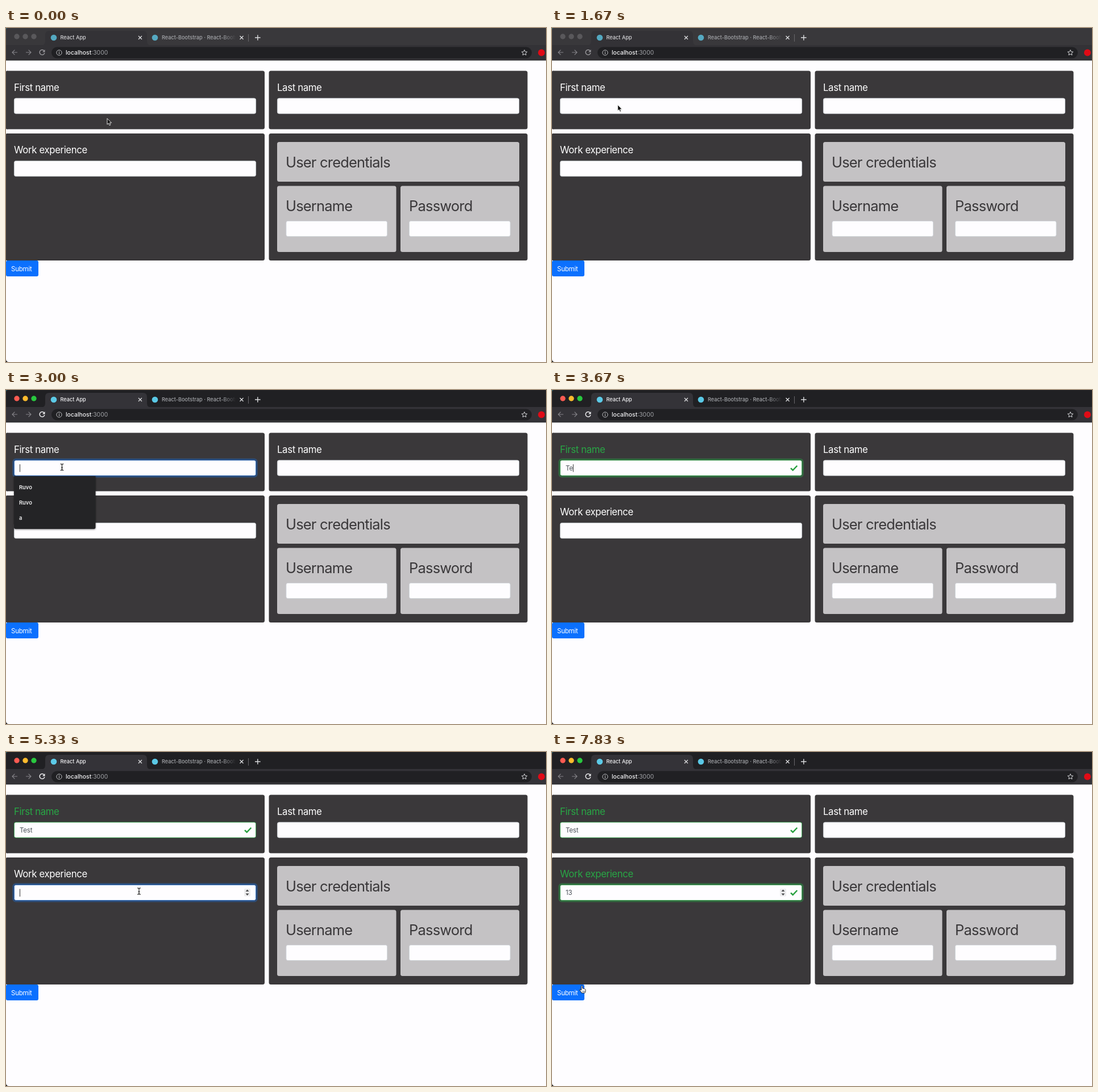
Recreate the animation shown at these times as an HTML page. Size 950 px wide and 589 px high, loop 8 s.

```html
<!DOCTYPE html>
<html lang="en">
<head>
<meta charset="utf-8">
<title>Form validation</title>
<style>
html, body { margin: 0; width: 100%; height: 100%; overflow: hidden; background: #fefdff; }
svg { display: block; width: 100%; height: 100%; font-family: Inter, "Open Sans", sans-serif; }
text { white-space: pre; }
.label { font-size: 16.8px; letter-spacing: -.37px; fill: #fff; }
.head { font-size: 25.4px; letter-spacing: -.75px; fill: #393739; }
.value { font-size: 11.5px; letter-spacing: -.2px; fill: #495057; }
.tab { font-size: 9.2px; font-weight: 500; }
.item { font-size: 9.4px; font-weight: 600; fill: #f1f1f2; }
</style>
</head>
<body>
<svg id="stage" viewBox="0 0 950 589"></svg>
<script>
const LOOP = 8000, STEP = 1000 / 6, FADE = 150;
const stage = document.getElementById('stage');
const GREEN = [40, 167, 69], BLUE = [28, 105, 205], GREY = [206, 212, 218];

function add(tag, attrs, text, parent = stage) {
  const el = document.createElementNS('http://www.w3.org/2000/svg', tag);
  set(el, attrs);
  if (text) el.textContent = text;
  return parent.appendChild(el);
}
function set(el, attrs) {
  for (const k in attrs) el.setAttribute(k, attrs[k]);
}
const box = (x, y, width, height, fill, rx = 0, more = {}) =>
  add('rect', { x, y, width, height, fill, rx, ...more });
const line = (d, stroke, width = 1.2, parent = stage) =>
  add('path', { d, stroke, 'stroke-width': width, fill: 'none' }, '', parent);
const label = (x, y, s, cls = 'label', more = {}) => add('text', { x, y, class: cls, ...more }, s);
const show = (el, on) => set(el, { visibility: on ? 'visible' : 'hidden' });
const clamp = v => Math.max(0, Math.min(1, v));
const mix = (a, b, k) => `rgb(${a.map((v, i) => Math.round(v + (b[i] - v) * k))})`;

// Browser chrome
const strip = box(0, 0, 950, 31, '#202023');
const tab = add('path', { d: 'M61 31q8 0 8-8V12q0-7 7-7H241q7 0 7 7v11q0 8 8 8z' });
const bar = box(0, 30, 950, 27.5, '#343338');
const lights = [19, 34, 49].map(cx => add('circle', { cx, cy: 15, r: 4.7 }));
const icons = [84, 262].map(cx => add('circle', { cx, cy: 17, r: 5.3, fill: '#61dafb' }));
const title = label(95.5, 20.3, 'React App', 'tab');
const fade = add('linearGradient', { id: 'fade', gradientUnits: 'userSpaceOnUse', x1: 380, x2: 405 });
add('stop', { offset: 0, 'stop-color': '#a4a6aa' }, '', fade);
add('stop', { offset: 1, 'stop-color': '#a4a6aa', 'stop-opacity': 0 }, '', fade);
label(274, 20.3, 'React-Bootstrap · React-Boots', 'tab', { fill: 'url(#fade)' });
const cross = x => line(`M${x - 3} 14l6 6m0-6l-6 6`, '#dedfe1', 1.3);
cross(236);
cross(414.5);
line('M426.5 11v13', '#68676b', 1);
line('M438 17h9.6m-4.8-4.8v9.6', '#dcdde0', 1.4);
line('M20 43H11m4.4-4.4L11 43l4.4 4.4M35 43h9m-4.4-4.4L44 43l-4.4 4.4', '#858489', 1.2);
const reload = add('path', { d: 'M67 40.2a4.4 4.4 0 1 0 .9 3.6', fill: 'none', 'stroke-width': 1.4 });
const reloadTip = add('path', { d: 'M68.5 38v4.4h-4.4z' });
box(80, 33.5, 845, 20, '#202023', 10);
add('circle', { cx: 93.5, cy: 43.5, r: 4.6, fill: 'none', stroke: '#c4c5c8', 'stroke-width': 1 });
line('M93.5 42.8v3.2M93.5 40.8v1.1', '#c4c5c8', 1.1);
const url = label(105, 47.2, '', 'url', { 'font-size': 10.4 });
add('tspan', { fill: '#f2f2f4', 'font-weight': 500 }, 'localhost', url);
add('tspan', { fill: '#a0a2a6' }, ':3000', url);
line('M912 38.6l1.4 3.2 3.5.3-2.7 2.3.8 3.4-3-1.8-3 1.8.8-3.4-2.7-2.3 3.5-.3z', '#d5d6d9', 1);
add('circle', { cx: 942, cy: 43.5, r: 6, fill: '#e00b16' });
line('M0 57H950', '#29282b', 1);
add('path', { d: 'M0 0h4Q0 0 0 4z', fill: '#27646d' });

// Page
box(0, 57.5, 950, 531.5, '#fefdff');
for (const x of [0, 462.5])
  for (const [y, h] of [[75.5, 103], [186, 224]]) {
    box(x, y, 455, h, '#3a383a', 3.5);
    if (!x) box(0, y, 4, h, '#3a383a', 1.5);
  }
box(477, 201, 426, 70, '#c4c2c4', 3.5);
box(477, 278.5, 209.5, 116.5, '#c4c2c4', 3.5);
box(694, 278.5, 209, 116.5, '#c4c2c4', 3.5);
label(492, 245.6, 'User credentials', 'head');
label(492, 323, 'Username', 'head');
label(709, 323, 'Password', 'head');
label(477, 110.5, 'Last name');
const input = (x, y, w) =>
  box(x + .4, y + .4, w - .8, 27.2, '#fefdff', 3, { stroke: '#ced4da', 'stroke-width': .8 });
input(477, 123.5, 426);
input(492.5, 340, 178.5);
input(709, 340, 178.5);
box(0, 410, 57, 28, '#0b70fe', 3);
label(9, 428.6, 'Submit', 'value', { style: 'fill:#fff' });
add('path', { d: 'M0 584q0 5 5 5H0z', fill: '#000' });

// Field with label, focus ring, caret and validity tick
function field(y, name) {
  const caption = label(14, y - 13, name);
  const halo = box(12.6, y - 1.4, 428.8, 30.8, 'none', 4.5, { 'stroke-width': 2.6 });
  const frame = input(14, y, 426);
  const value = label(24, y + 18.3, ' ', 'value');
  const caret = box(24, y + 7.5, 1, 13.5, '#333');
  const tick = line(`M420 ${y + 14.3}l3.7 3.7 7.6-8`, '#28a040', 2.5);
  return { caption, halo, frame, value, caret, tick };
}
function paint(f, text, focus, valid, caret) {
  const ok = clamp(valid);
  const color = mix(mix(GREY, BLUE, focus).match(/\d+/g).map(Number), GREEN, ok);
  const ring = mix(BLUE, GREEN, ok);
  f.caption.style.fill = valid >= 0 ? '#28a745' : '#fff';
  set(f.frame, { stroke: color });
  set(f.halo, { stroke: ring, 'stroke-opacity': .42 * focus });
  f.value.textContent = text;
  show(f.tick, valid >= 0);
  show(f.caret, caret);
  if (caret) set(f.caret, { x: 24 + (text ? f.value.getComputedTextLength() : 0) });
}
const first = field(123.5, 'First name');
const work = field(234, 'Work experience');
const spin = add('g', {});
add('rect', { x: -5.5, y: 241, width: 11, height: 13.5, rx: 1.5, fill: '#ececee' }, '', spin);
add('path', { d: 'M-3 246l3-3.6 3 3.6zM-3 249.5l3 3.6 3-3.6z', fill: '#48484a' }, '', spin);

const menu = add('g', { style: 'filter:drop-shadow(0 1px 1.5px rgba(0,0,0,.5))' });
add('path', { d: 'M14 152H157.500V242q0 3-3 3H17q-3 0-3-3z', fill: '#242426' }, '', menu);
['Ruvo', 'Ruvo', 'a'].forEach((s, i) =>
  add('text', { x: 23, y: 175.3 + 27 * i, class: 'item' }, s, menu));

// Pointers, each drawn with its hot spot at 0,0
const ring = add('circle', { r: 12.4, fill: '#fff', 'fill-opacity': .3, stroke: '#111', 'stroke-width': 1.7 });
const pointers = { arrow: add('g', {}), beam: add('g', {}), hand: add('g', {}) };
add('path', {
  d: 'M0 0V10.6L2.4 8.400 4 12.200 5.900 11.400 4.300 7.700H7.600Z',
  fill: '#111', stroke: '#f4f4f4', 'stroke-width': .9
}, '', pointers.arrow);
const beam = 'M-2.8-5.600Q0-5.600 0-4V4Q0 5.600-2.800 5.600M2.800-5.600Q0-5.600 0-4M0 4Q0 5.600 2.800 5.600M-1.500 1H1.500';
line(beam, '#fff', 2, pointers.beam);
line(beam, '#111', 1.1, pointers.beam);
add('path', {
  d: 'M-1.500-5Q-1.500-6.300-.4-6.300T.7-5V-1.500Q2-2.300 2.700-1 4-1.600 4.500-.4 6-.6 6 1V3Q6 5 4.700 6.500H-.8Q-2 4-4.300 1.500-4.500 0-3 .2L-1.500 1.500Z',
  fill: '#fff', stroke: '#111', 'stroke-width': .9
}, '', pointers.hand);
line('M.8 2.500v2.500M2.600 2.500v2.500M4.300 2.500v2.500', '#111', .6, pointers.hand);

// Time, x, y
const moves = [
  [[0, 178, 159.5], [500, 178, 159.5], [1167, 136, 138], [1333, 136, 138], [1500, 133, 135], [1833, 98.5, 136], [3490, 98.5, 136]],
  [[4990, 226, 214], [5160, 234, 245.5], [6660, 234, 245.5]],
  [[7320, 200, 280], [7820, 53, 418.5], [8000, 53, 418.5]]
];
function pointerAt(t) {
  const path = moves.find(m => t >= m[0][0] && t < m[m.length - 1][0]);
  if (!path) return null;
  const i = path.findIndex(p => p[0] > t), [a, b] = [path[i - 1], path[i]];
  const k = (t - a[0]) / (b[0] - a[0]);
  return [a[1] + (b[1] - a[1]) * k, a[2] + (b[2] - a[2]) * k];
}
function pointerKind(t, x, y) {
  if (t < 1950) return 'arrow';
  if (x < 57 && y > 410) return 'hand';
  const inField = x > 14 && x < 440 && [123.5, 234].some(top => y > top && y < top + 28);
  return inField ? 'beam' : 'arrow';
}

const typed = (t, s, times) => s.slice(0, times.filter(k => t >= k).length);
const blink = (t, since) => Math.floor((t - since) / 500) % 2 === 0;
const ramp = (t, start) => clamp((t - start) / FADE);
const since = (t, start) => t < start ? -1 : (t - start) / FADE;

function draw(now) {
  const t = Math.floor((now % LOOP + 5) / STEP) * STEP + 1;
  const active = t > 1950;
  set(strip, { fill: active ? '#202023' : '#39383b' });
  set(tab, { fill: active ? '#343338' : '#333236' });
  set(bar, { fill: active ? '#343338' : '#333236' });
  lights.forEach((el, i) => set(el, { fill: active ? ['#fe5b52', '#fdbb2d', '#29c83f'][i] : '#59585b' }));
  icons.forEach(el => set(el, { opacity: active ? .9 : .7 }));
  set(title, { fill: active ? '#f2f2f4' : '#d4d4d7' });
  set(reload, { stroke: active ? '#f0f0f2' : '#99989c' });
  set(reloadTip, { fill: active ? '#f0f0f2' : '#99989c' });

  const keys1 = [3490, 3660, 3830, 3990], keys2 = [6660, 6990];
  const focus1 = t < 5160 ? ramp(t, 1950) : 1 - ramp(t, 5160);
  const focus2 = ramp(t, 5160);
  const caret1 = t > 1990 && t < 5160 && blink(t, t < 3490 ? 1990 : Math.max(...keys1.filter(k => k <= t)));
  const caret2 = t > 5160 && blink(t, t < 6660 ? 5160 : Math.max(...keys2.filter(k => k <= t)));
  paint(first, typed(t, 'Test', keys1), focus1, since(t, 3490), caret1);
  paint(work, typed(t, '13', keys2), focus2, since(t, 6660), caret2);
  show(spin, t > 5160);
  set(spin, { transform: `translate(${t < 6660 ? 424.5 : 406.5} 0)` });
  show(menu, t > 1950 && t < 3490);

  const pos = pointerAt(t), kind = pos && pointerKind(t, ...pos);
  for (const k in pointers) {
    show(pointers[k], k === kind);
    if (k === kind) set(pointers[k], { transform: `translate(${pos})` });
  }
  const click = [1990, 5160].some(c => t >= c && t < c + 160);
  show(ring, click && pos);
  if (click) set(ring, { cx: pos[0], cy: pos[1] });
}

const start = performance.now();
(function tick() {
  draw(performance.now() - start);
  requestAnimationFrame(tick);
})();
</script>
</body>
</html>
```
